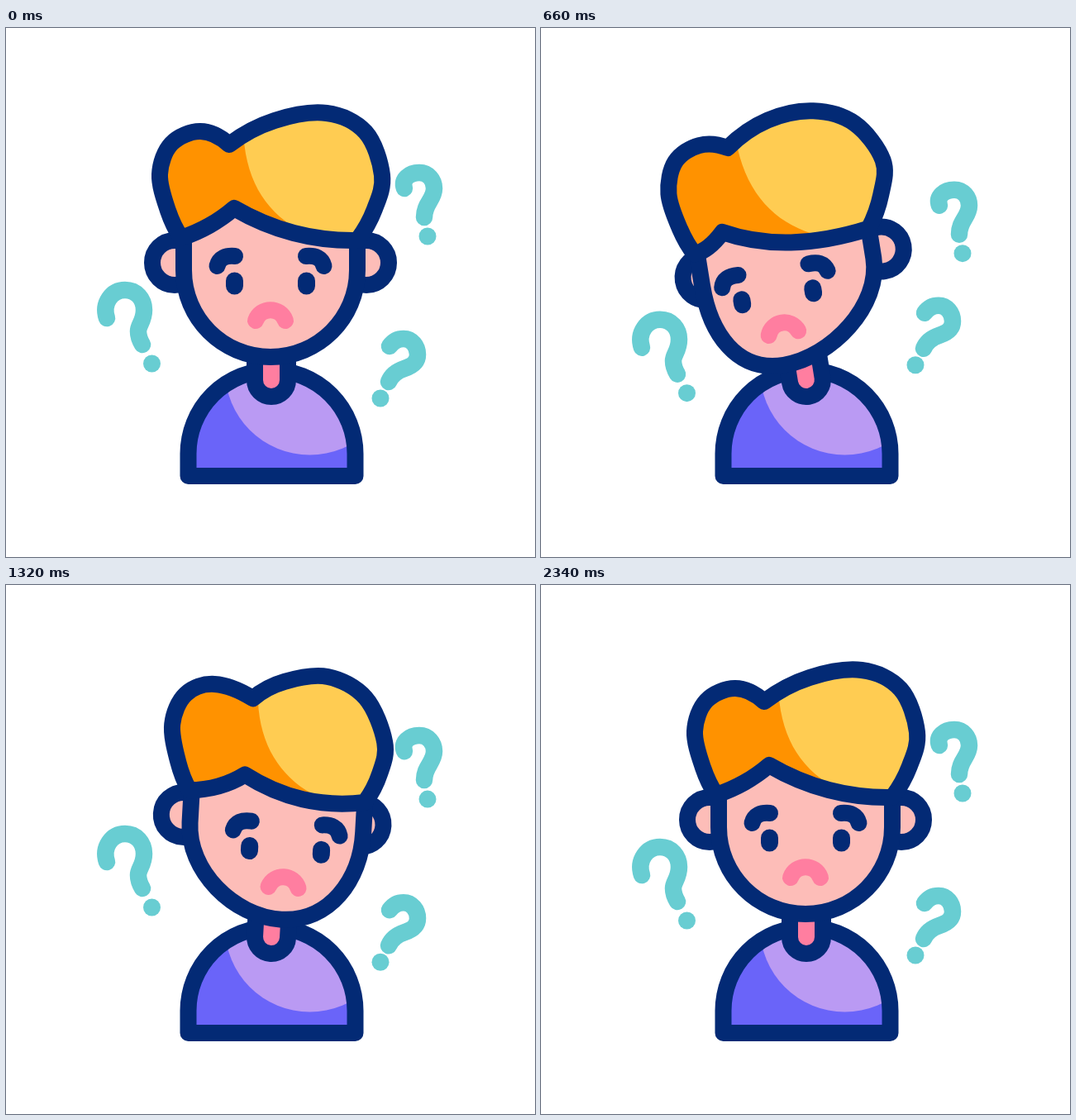
Write an HTML page with a canvas that moves like this. It is 640 px wide and 640 px high and loops after 2.4 s.

```html
<!DOCTYPE html>
<html lang="en">
<head>
<meta charset="utf-8">
<title>Puzzled</title>
<style>
html, body { margin: 0; height: 100%; overflow: hidden; background: #fff; }
canvas { display: block; width: 640px; height: 640px; }
</style>
</head>
<body>
<canvas id="stage" width="640" height="640"></canvas>
<script>
const ctx = document.getElementById('stage').getContext('2d');
const LOOP = 2400;
const NAVY = '#032a75', SKIN = '#fdbdb8', PINK = '#ff7ea0', CYAN = '#68cdd2';
const ORANGE = '#ff9200', YELLOW = '#ffcc52', VIOLET = '#6a64f9', LILAC = '#ba9af3';
const PIVOT = [321, 427];

// Head turn weights: 0 is facing front, 1 is fully turned.
const LEFT_TURN = [[0, 0], [770, 1], [1510, 0]];
const RIGHT_TURN = [[0, 0], [770, 0], [1510, 1], [2220, 0]];

const BODY = new Path2D('M220.5 542V515A101 101 0 0 1 422.5 515V542Z');
const BODY_LIGHT = disc(367.5, 414, 102.5);
const NECK = new Path2D('M301 395V426A20 20 0 0 0 341 426V395');
const HAIR_LIGHT = new Path2D('M287 90V120C288 180 312 220 352 243Q375 256 400 263L460 300L540 90Z');
const BROWS = new Path2D('M255.5 288C258 278 266 275 277 276M384.5 288C382 278 374 275 363 276');
const EYES = new Path2D('M276.5 306V312M363.5 306V312');
const MOUTH = new Path2D('M302 354C308 337 332 337 338 354');

const MARKS = [
  { hook: 'M122 351C116 333 128 317 144 317C158 317 167 328 167 341C167 355 160 359 160 367C160 374 162 378 165 383',
    dot: [176.5, 406], bob: [[0, 0], [700, 36], [1120, -30], [1780, 33], [2340, 0]] },
  { hook: 'M482 194C478 183 488 175 500 175C511 175 518 184 518 194C518 208 506 212 506 229',
    dot: [510, 252], bob: [[0, 0], [500, 35], [1080, -41], [1510, 40.5], [2200, 0]] },
  { hook: 'M464 385C469 378 475 376 481 376C491 376 498 385 498 395C498 405 491 409 482 412C473 415 466 421 463 428',
    dot: [453, 448], bob: [[0, 0], [720, -41], [1110, 18], [1880, -35], [2340, 0]] }
].map(mark => ({ ...mark, hook: new Path2D(mark.hook) }));

// Eased value of a keyframe list at time t.
function track(keys, t) {
  const next = keys.findIndex(key => key[0] > t);
  if (next < 0) return keys[keys.length - 1][1];
  const [t0, a] = keys[next - 1], [t1, b] = keys[next];
  const u = (t - t0) / (t1 - t0);
  return a + (b - a) * u * u * (3 - 2 * u);
}

function stroke(path, color = NAVY, width = 20) {
  ctx.strokeStyle = color;
  ctx.lineWidth = width;
  ctx.stroke(path);
}

function fill(path, color) {
  ctx.fillStyle = color;
  ctx.fill(path);
}

function outlined(path, color) {
  fill(path, color);
  stroke(path);
}

function disc(x, y, r) {
  const path = new Path2D();
  path.arc(x, y, r, 0, Math.PI * 2);
  return path;
}

function shifted([x, y], draw) {
  ctx.save();
  ctx.translate(x, y);
  draw();
  ctx.restore();
}

// Fill in two tones, the light one cut to the outline, then stroke.
function twoTone(outline, base, lightShape, light, shift = [0, 0]) {
  fill(outline, base);
  ctx.save();
  ctx.clip(outline);
  shifted(shift, () => fill(lightShape, light));
  ctx.restore();
  stroke(outline);
}

// Catmull-Rom curve through the points, with parabolic ends.
function smooth(path, points) {
  const beyond = (a, b, c) => a.map((v, i) => 3 * v - 3 * b[i] + c[i]);
  const n = points.length;
  const p = [beyond(...points), ...points, beyond(points[n - 1], points[n - 2], points[n - 3])];
  for (let i = 1; i < n; i++) {
    const [a, b, c, d] = p.slice(i - 1, i + 3);
    path.bezierCurveTo(
      b[0] + (c[0] - a[0]) / 6, b[1] + (c[1] - a[1]) / 6,
      c[0] - (d[0] - b[0]) / 6, c[1] - (d[1] - b[1]) / 6, ...c);
  }
}

// The outline has four corners; each region slides by its own amount as the head turns.
function hairPath(turn) {
  const at = (x, y, [dx, dy] = [0, 0], k = 1) => [x + dx * k, y + dy * k];
  const lobe = turn(7, 0, 0, -2), crown = turn(-7, 3, -18, 5);
  const side = turn(0, 0, -12, 6), fringe = turn(-28, 16, 8, 13);
  const nape = at(212, 254), temple = at(425, 257);
  const notch = at(270, 141, turn(2, -8, 15, -1)), tip = at(276, 218, fringe);

  const path = new Path2D();
  path.moveTo(...nape);
  smooth(path, [nape, at(196, 221, lobe, 0.5), at(186, 177, lobe), at(200, 140, lobe), at(235, 125, lobe, 0.5), notch]);
  smooth(path, [notch, at(325, 112, turn(0, -4, -6, 6)), at(388, 103, crown), at(435, 126, crown),
    at(455, 178, side), at(446, 219, side, 0.5), temple]);
  smooth(path, [temple, at(348, 248, fringe, 0.7), tip]);
  smooth(path, [tip, at(246, 239, fringe, 0.6), nape]);
  path.closePath();
  return path;
}

function facePath([dx, dy]) {
  const x = 320 + dx, y = 398 + dy;
  const path = new Path2D('M425 293V210H215V293');
  path.bezierCurveTo(215, 351, x - 58, y, x, y);
  path.bezierCurveTo(x + 58, y, 425, 351, 425, 293);
  path.closePath();
  return path;
}

function drawHead(left, right) {
  // Shift made of a full-left and a full-right part.
  const turn = (lx, ly, rx, ry) => [lx * left + rx * right, ly * left + ry * right];

  ctx.save();
  ctx.translate(...PIVOT);
  ctx.rotate((5.65 * right - 9.7 * left) * Math.PI / 180);
  ctx.translate(-PIVOT[0], -PIVOT[1]);

  outlined(NECK, PINK);
  outlined(disc(204 + 17 * left, 284, 27), SKIN);
  outlined(disc(436 - 17 * right, 284, 27), SKIN);
  outlined(facePath(turn(-24, 6, 19, 6)), SKIN);
  shifted(turn(-18, 12.2, 18, 11), () => {
    stroke(BROWS);
    stroke(EYES, NAVY, 21);
    stroke(MOUTH, PINK);
  });
  twoTone(hairPath(turn), ORANGE, HAIR_LIGHT, YELLOW, turn(-4, 5, 2, 3));
  ctx.restore();
}

function frame(now) {
  const t = now % LOOP;
  ctx.fillStyle = '#fff';
  ctx.fillRect(0, 0, 640, 640);
  ctx.lineCap = ctx.lineJoin = 'round';
  twoTone(BODY, VIOLET, BODY_LIGHT, LILAC);
  drawHead(track(LEFT_TURN, t), track(RIGHT_TURN, t));
  for (const { hook, dot, bob } of MARKS) {
    shifted([0, track(bob, t)], () => {
      stroke(hook, CYAN, 20.5);
      fill(disc(...dot, 10.5), CYAN);
    });
  }
  requestAnimationFrame(frame);
}
requestAnimationFrame(frame);
</script>
</body>
</html>
```
